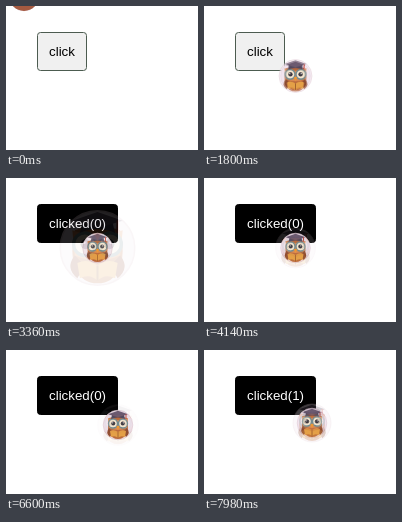
Recreate the animation shown at these times as an HTML page. Size 192 px wide and 144 px high, loop 8 s.

```html
<!DOCTYPE html>
<html lang="en">
<head>
<meta charset="utf-8">
<style>
  html, body { margin: 0; width: 100%; height: 100%; overflow: hidden; background: #fff; }
  svg { position: absolute; left: 0; top: 0; display: block; }
  text { font: 13.333px "Liberation Sans", Arial, sans-serif; }
</style>
</head>
<body>
<svg width="192" height="144" viewBox="0 0 192 144">
  <defs>
    <g id="owl">
      <circle r="14.8" fill="#f1e4ee" stroke="#dcc3cd" stroke-width=".6"/>
      <path d="M-9-7Q-11 2-9 8Q-6 14 0 14Q6 14 9 8Q11 2 9-7Q0-10-9-7Z" fill="#b9683c"/>
      <path d="M-10-7Q0-3 10-7L9 3Q0 7-9 3Z" fill="#d98a55"/>
      <path d="M-9 3Q-13 8-8 12L-5 7ZM9 3Q13 8 8 12L5 7Z" fill="#8d4b30"/>
      <path d="M-8 6Q-4 4 0 7Q4 4 8 6L7 12Q3 10 0 13Q-3 10-7 12Z" fill="#e4a047"/>
      <path d="M0 7V13" stroke="#9a5a2c" stroke-width=".8"/>
      <g id="eye">
        <circle cx="-5" cy="-1.5" r="4.5" fill="#f4e6cf" stroke="#738c91" stroke-width="1.3"/>
        <circle cx="-4.7" cy="-1.5" r="2" fill="#3d3840"/>
        <circle cx="-5.3" cy="-2.2" r=".6" fill="#fff"/>
      </g>
      <use href="#eye" transform="scale(-1 1)"/>
      <path d="M-1.6 1H1.6L0 5Z" fill="#ee9a34"/>
      <path d="M-6-10H6L7-6Q0-9-7-6Z" fill="#51465d"/>
      <path d="M0-14.3L10-10.8L0-7.8L-10-10.8Z" fill="#6c5a70"/>
      <path d="M8-11V-6" stroke="#c24d45" stroke-width="1"/>
    </g>
  </defs>
  <rect id="button" x="31.5" y="26.5" height="38" rx="3"/>
  <text id="label" x="43" y="50"></text>
  <g id="cursor">
    <use href="#owl"/>
    <use id="echo" href="#owl"/>
    <circle id="tint" r="15" fill="#a45a40"/>
  </g>
</svg>
<script>
const LOOP = 8000, STEP = 60, PULSE = 800, RIPPLE = 640;
const [button, label, cursor, echo, tint] =
  ["button", "label", "cursor", "echo", "tint"].map(id => document.getElementById(id));

// time, x, y
const path = [
  [0, 18, -10], [540, 99, 73], [780, 91.5, 70], [4920, 91.5, 70],
  [5340, 114, 72], [5520, 113, 72], [5940, 112, 75],
  [7420, 112, 75], [7680, 105, 70], [7980, 108, 73]
];
const clicks = [2820, 6780];
const captions = [[0, "click"], [2880, "clicked(0)"], [6840, "clicked(1)"]];

const ease = p => p * p * (3 - 2 * p);

function position(t) {
  const next = path.findIndex(point => point[0] > t);
  if (next < 0) return path[path.length - 1].slice(1);
  const [t0, x0, y0] = path[next - 1], [t1, x1, y1] = path[next];
  const p = ease((t - t0) / (t1 - t0));
  return [x0 + (x1 - x0) * p, y0 + (y1 - y0) * p];
}

// scale and opacity of the expanding copy
function echoAt(t) {
  const click = clicks.filter(time => time <= t).pop();
  if (click !== undefined && t < click + RIPPLE) {
    const p = (t - click) / RIPPLE;
    return [1 + 1.8 * p, 0.9 * (1 - p)];
  }
  const start = click === undefined ? 780 : click + RIPPLE;
  if (t < start) return [1, 0];
  const p = (t - start) % PULSE / PULSE;
  return [1 + 0.4 * p, 0.9 * (1 - p)];
}

function draw(t) {
  const caption = captions.filter(([time]) => time <= t).pop()[1];
  const clicked = caption !== "click";
  label.textContent = caption;
  label.setAttribute("fill", clicked ? "#fff" : "#000");
  button.setAttribute("width", clicked ? 80 : 49);
  button.setAttribute("fill", clicked ? "#000" : "#f0f0f0");
  button.setAttribute("stroke", clicked ? "#000" : "#4c5c50");

  const [scale, opacity] = echoAt(t);
  cursor.setAttribute("transform", `translate(${position(t)})`);
  echo.setAttribute("transform", `scale(${scale})`);
  echo.setAttribute("opacity", opacity);
  tint.setAttribute("opacity", Math.max(0, 1 - t / 240));
}

function tick() {
  const t = performance.now() % LOOP;
  draw(Math.floor(t / STEP) * STEP);
  requestAnimationFrame(tick);
}
tick();
</script>
</body>
</html>
```
